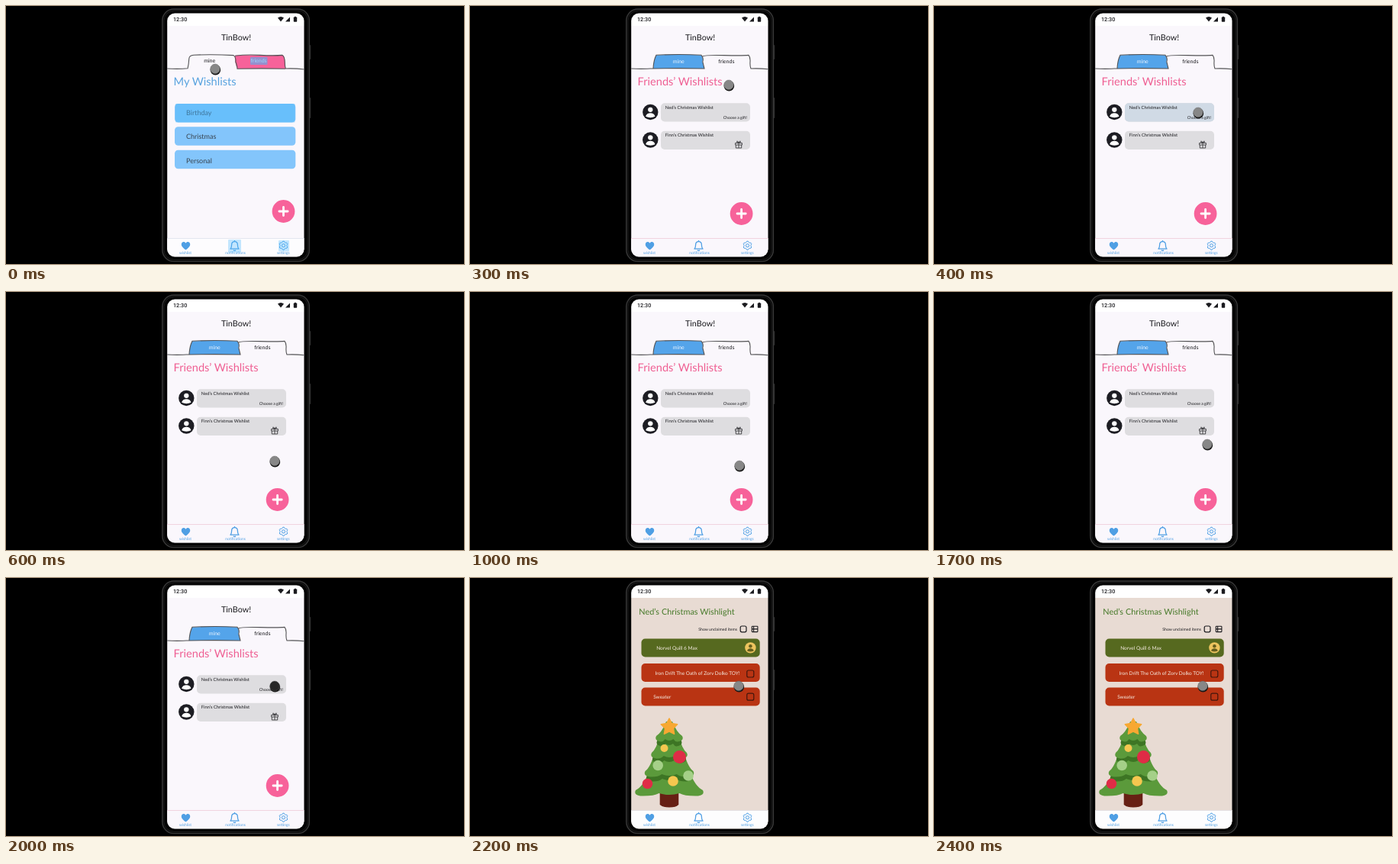
These frames come from a looping animation (600 by 338 pixels, 2.5 s). An HTML page:

```html
<!DOCTYPE html>
<html lang="en">
<head>
<meta charset="utf-8">
<title>Wishlist app</title>
<style>
html, body { margin: 0; width: 100%; height: 100%; overflow: hidden; background: #000; }
svg { display: block; }
text { font-family: Lato, "Open Sans", sans-serif; text-rendering: geometricPrecision; }
.clock { font-family: Roboto, sans-serif; font-weight: 500; }
</style>
</head>
<body>
<svg id="stage" width="600" height="338" viewBox="0 0 600 338"></svg>
<script>
const BLUE = '#4f9fe4', PINK = '#f7629a', INK = '#1b1b1f', PENCIL = '#525254';

const box = (x, y, w, h, r, fill, extra = '') =>
  `<rect x="${x}" y="${y}" width="${w}" height="${h}" rx="${r}" fill="${fill}" ${extra}/>`;
const dot = (x, y, r, fill, extra = '') =>
  `<circle cx="${x}" cy="${y}" r="${r}" fill="${fill}" ${extra}/>`;
const shape = (d, fill, extra = '') => `<path d="${d}" fill="${fill}" ${extra}/>`;
const line = (d, color, width, extra = '') =>
  `<path d="${d}" fill="none" stroke="${color}" stroke-width="${width}" ${extra}/>`;
const label = (s, x, y, size, fill, anchor = 'start') =>
  `<text x="${x}" y="${y}" font-size="${size}" fill="${fill}" text-anchor="${anchor}">${s}</text>`;
const group = (id, body) => `<g id="${id}">${body}</g>`;

function phone() {
  return box(397, 51, 2.2, 19, 1, '#303030') + box(397, 120, 2.2, 27, 1, '#303030') +
    box(204.8, 4, 192.6, 330.6, 15, '#0a0a0a', 'stroke="#383838" stroke-width="1.4"') +
    box(207, 6.2, 188.2, 326.2, 13, '#030303', 'stroke="#1c1c1c"');
}

function statusBar() {
  return box(211, 9, 180, 17, 0, '#fff') +
    '<text class="clock" x="219" y="20.2" font-size="7.2" fill="#1b1b1f">12:30</text>' +
    shape('M356 15.6Q360 12.4 364 15.6L360 20.6Z', INK) +
    shape('M366 20.6L372 14.4V20.6Z', INK) +
    box(376.8, 14.6, 4.4, 6.2, .7, INK) + box(378.1, 13.8, 1.8, 1.2, 0, INK);
}

function gear(x, y) {
  let d = '';
  for (let i = 0; i < 24; i++) {
    const a = (i - .5) * Math.PI / 12, r = i % 4 < 2 ? 5.7 : 4.5;
    d += (i ? 'L' : 'M') + (x + r * Math.sin(a)).toFixed(2) + ' ' + (y - r * Math.cos(a)).toFixed(2);
  }
  return line(d + 'Z', BLUE, 1, 'stroke-linejoin="round"') + dot(x, y, 2.1, 'none', `stroke="${BLUE}"`);
}

function navBar(bg, edge) {
  return box(211, 304.5, 180, 24, 0, bg) + line('M211 304.5H391', edge, 1) +
    shape('M235.5 319.6C231 316 229.6 314 229.8 311.9C230 308.6 234 307.9 235.5 310.7C237 307.9 241 308.6 241.2 311.9C241.4 314 240 316 235.5 319.6Z', BLUE) +
    line('M294 318.2H305C303.6 316.8 303.4 315.5 303.4 313C303.4 310 301.8 308.7 299.5 308.7S295.6 310 295.6 313C295.6 315.5 295.4 316.8 294 318.2Z', BLUE, 1.3, 'stroke-linejoin="round"') +
    line('M299.5 307V309M298 319.8Q299.5 321.4 301 319.8', BLUE, 1.3) +
    gear(363.5, 313.8) +
    label('wishlist', 235, 325.4, 4.9, BLUE, 'middle') +
    label('notifications', 300.5, 325.4, 4.9, BLUE, 'middle') +
    label('settings', 363.3, 325.4, 4.9, BLUE, 'middle');
}

function addButton(x, y) {
  return dot(x, y, 14.9, PINK) +
    line(`M${x - 5.6} ${y}h11.2M${x} ${y - 5.6}v11.2`, '#fff', 2.8, 'stroke-linecap="round"');
}

function person(x, y, r, back, front) {
  const k = r / 10;
  return dot(x, y, r, back) + dot(x, y - 3.1 * k, 3.1 * k, front) +
    shape(`M${x - 6 * k} ${y + 5.6 * k}C${x - 5 * k} ${y - .2 * k} ${x + 5 * k} ${y - .2 * k} ${x + 6 * k} ${y + 5.6 * k}Q${x} ${y + 8.4 * k} ${x - 6 * k} ${y + 5.6 * k}Z`, front);
}

function page(title, color) {
  return box(211, 26, 180, 303, 0, '#faf7fc') +
    label('TinBow!', 301.5, 45.2, 10.8, INK, 'middle') +
    label(title, 219.6, 104.3, 14.6, color);
}

function minePage() {
  const row = (s, y, base) => box(221, y, 158.3, 24.4, 4.5, '#83c5fb') + label(s, 236, base, 9, '#38424d');
  const hint = (x, y, w, h, a) => box(x, y, w, h, 1, `rgba(72,182,250,${a})`);
  return page('My Wishlists', '#58a3df') +
    shape('M300 65Q302 63.8 330 64.4T363 64.6Q365.5 66 366 82H303Q299 73 300 65Z', PINK) +
    line('M211 82Q226 82.8 238 81.8Q239.4 76 239.8 69Q240 64.6 246 64.2Q272 63.2 298 64.6Q301.5 67 300.8 73Q303 79 303 82.2Q335 81.6 366 82.2', PENCIL, 1.1) +
    line('M300 65.2Q315 63.4 333 64.4T362 64.4Q365 66 365.2 73T366.5 82Q379 81.6 391 83', PENCIL, 1.1) +
    label('mine', 266.7, 74.3, 7, INK, 'middle') + label('friends', 331, 74.3, 7, '#fff', 'middle') +
    row('Birthday', 128, 143.2) + row('Christmas', 158.3, 173.6) + row('Personal', 188.8, 206.2) +
    addButton(363.5, 269) + navBar('#fdfcfe', '#e3e6f0') +
    group('hints', hint(222, 128, 156.5, 24.5, .45) + hint(320, 67, 22.5, 10, .55) +
      hint(291, 306, 17, 17, .32) + hint(357, 307, 14, 14.5, .32));
}

function friendsPage() {
  const card = y => person(236.3, y + 11.8, 10.2, '#1d1d23', '#fff') +
    box(250, y, 117, 24.2, 5, '#dedde0');
  return page('Friends’ Wishlists', '#ef5f93') +
    shape('M240 82Q240.5 70 244 64.5Q275 62.6 303 64.4Q306 68 304.5 73L307 82Z', '#54a4ea') +
    line('M211 82Q226 82.8 240 81.8Q240.6 71 244 64.3Q274 62.6 303 64.3Q306.4 68 304.8 73L307 82Q274 81.3 240 82', PENCIL, 1.1) +
    line('M304.5 66Q308 64 333 64.6T365 64.4Q367.4 67 367 73T368 82Q380 81.5 391 82.8', PENCIL, 1.1) +
    label('mine', 273.3, 74.6, 7, '#eef6ff', 'middle') + label('friends', 335.8, 74.6, 7, INK, 'middle') +
    card(127.2) + card(163.7) +
    box(250, 127.2, 117, 24.2, 5, '#d0dae5', 'id="cardHint"') +
    label('Ned’s Christmas Wishlist', 255.8, 134.6, 5.8, INK) +
    label('Finn’s Christmas Wishlist', 255.8, 171.1, 5.8, INK) +
    label('Choose a gift!', 363, 147.9, 5.2, INK, 'end') +
    line('M347.6 179.5H356.4V182H347.6ZM348.3 182V186H355.7V182M352 179.5V186M352 179.3Q348.8 179 349.6 177.2Q351 176.4 352 179.3Q353 176.4 354.4 177.2Q355.2 179 352 179.3', '#3a3a3e', .9) +
    addButton(355.6, 272) + navBar('#faf7fc', '#f1d3df');
}

function tree() {
  const x = 261, light = '#5b9a3b', dark = '#3d7524';
  // Half of the outline, s is the side: shoulder, flare, rounded tip, wavy hem
  const tier = (top, shoulder, tip, w, fill) => {
    const p = (dx, y) => `${(x + dx).toFixed(1)} ${y}`;
    return shape(`M${p(shoulder, top)}Q${p(shoulder + (w - shoulder) * .4, tip - 9)} ${p(w - 1, tip - 4)}` +
      `Q${p(w + 2, tip + 2)} ${p(w - 7, tip + 3.5)}Q${p(w * .45, tip + 4)} ${p(w * .3, tip)}` +
      `Q${p(0, tip + 4)} ${p(-w * .3, tip)}Q${p(-w * .45, tip + 4)} ${p(7 - w, tip + 3.5)}` +
      `Q${p(-w - 2, tip + 2)} ${p(1 - w, tip - 4)}` +
      `Q${p(-shoulder - (w - shoulder) * .4, tip - 9)} ${p(-shoulder, top)}Z`, fill);
  };
  // top, shoulder, tip, half width
  const tiers = [[252, 26, 282, 45], [228, 19, 257, 32.5], [206, 12, 233, 24], [188, 4, 211, 18]];
  let star = '';
  for (let i = 0; i < 10; i++) {
    const a = i * Math.PI / 5, r = i % 2 ? 5.8 : 11.2;
    star += (i ? 'L' : 'M') + (x + r * Math.sin(a)).toFixed(1) + ' ' + (195.2 - r * Math.cos(a)).toFixed(1);
  }
  const balls = [[254.5, 223, 5, '#f5c74f'], [274.5, 234.6, 8.5, '#df2c46'], [246.2, 245.5, 6.8, '#a5d088'],
    [286, 259, 6.8, '#a5d088'], [232.5, 269.5, 6.8, '#df2c46'], [266, 266, 6.8, '#f5c74f']];
  return shape('M248.7 280H273.3V297Q270 300.5 261 300.5T248.7 297Z', '#672014') +
    tiers.map(([top, shoulder, tip, w], i) =>
      (i ? tier(top + 6, shoulder, tip + 6, w * .93, dark) : '') + tier(top, shoulder, tip, w, light)).join('') +
    balls.map(b => dot(...b)).join('') +
    shape(star + 'Z', '#f7a832', 'stroke="#f7a832" stroke-width="1.5" stroke-linejoin="round"');
}

function giftPage() {
  const item = (s, x, y, base, fill) => box(224.5, y, 155.2, 24, 5, fill) + label(s, x, base, 6.5, '#f6ece2');
  const check = (x, y, w, color) => box(x, y, w, w, 2, 'none', `stroke="${color}" stroke-width="1.2"`);
  return box(211, 26, 180, 303, 0, '#e8dbd3') +
    label('Ned’s Christmas Wishlight', 221.3, 48, 10.9, '#477a2a') +
    label('Show unclaimed items', 350, 68.7, 5.2, INK, 'end') + check(354.2, 63, 7.8, INK) +
    box(369.3, 63.2, 7.6, 7.4, .6, 'none', `stroke="${INK}" stroke-width="1.1"`) +
    line('M369 66.9H377M371.6 63V71', INK, 1.1) +
    item('Norvel Quill 6 Max', 244.2, 79.5, 94, '#56691f') +
    item('Iron Drift The Oath of Zorv Dolko TOY!', 242.6, 112, 126.6, '#b93413') +
    item('Sweater', 240.2, 143.5, 157.6, '#b93413') +
    person(367.4, 91.4, 7.2, '#edc45e', '#665f1e') +
    check(362.8, 121, 9, '#42160c') + check(362.8, 151.2, 9, '#42160c') +
    tree() + navBar('#fdfdfe', '#e3dfe2');
}

const cursor = dot(.4, .7, 6.8, '#161616') +
  dot(0, -.6, 6.3, '#878787', 'id="knob" stroke="#5c5c5c" stroke-width=".8" stroke-dasharray="1.2 1"');

const stage = document.getElementById('stage');
stage.innerHTML = '<clipPath id="screen"><rect x="211.2" y="9.6" width="179.3" height="318.8" rx="10"/></clipPath>' +
  phone() + '<g clip-path="url(#screen)">' + group('mine', minePage()) + group('friends', friendsPage()) +
  group('gifts', giftPage()) + statusBar() + '</g>' + group('cursor', cursor);

const LOOP = 2500, STEP = 100;
// time, x, y
const path = [[0, 274, 83], [100, 301, 79], [200, 331, 74], [300, 339, 104], [400, 346, 140],
  [500, 350, 178], [600, 352, 222], [900, 352, 222], [1000, 353, 228], [1200, 354, 234],
  [1400, 356, 224], [1500, 356, 224], [1700, 358, 200], [1800, 357, 181], [2000, 352, 142], [LOOP, 352, 142]];

function locate(t) {
  const i = path.findIndex(p => p[0] > t);
  const [t0, x0, y0] = path[i - 1], [t1, x1, y1] = path[i];
  const k = (t - t0) / (t1 - t0);
  return [x0 + (x1 - x0) * k, y0 + (y1 - y0) * k];
}

const el = id => document.getElementById(id);
const show = (id, on) => el(id).style.display = on ? '' : 'none';

function draw(now) {
  const t = Math.floor(now % LOOP / STEP) * STEP;
  show('mine', t < 300);
  show('friends', t >= 300 && t < 2200);
  show('gifts', t >= 2200);
  el('hints').style.opacity = Math.max(0, 1 - t / 200);
  el('cardHint').style.opacity = t < 400 ? 0 : Math.max(0, 1 - (t - 400) / 200);
  el('cursor').setAttribute('transform', `translate(${locate(t)})`);
  el('knob').setAttribute('fill', t >= 2000 && t < 2200 ? '#262626' : '#878787');
}

const start = performance.now();
function tick() {
  draw(performance.now() - start);
  requestAnimationFrame(tick);
}
tick();
</script>
</body>
</html>
```
